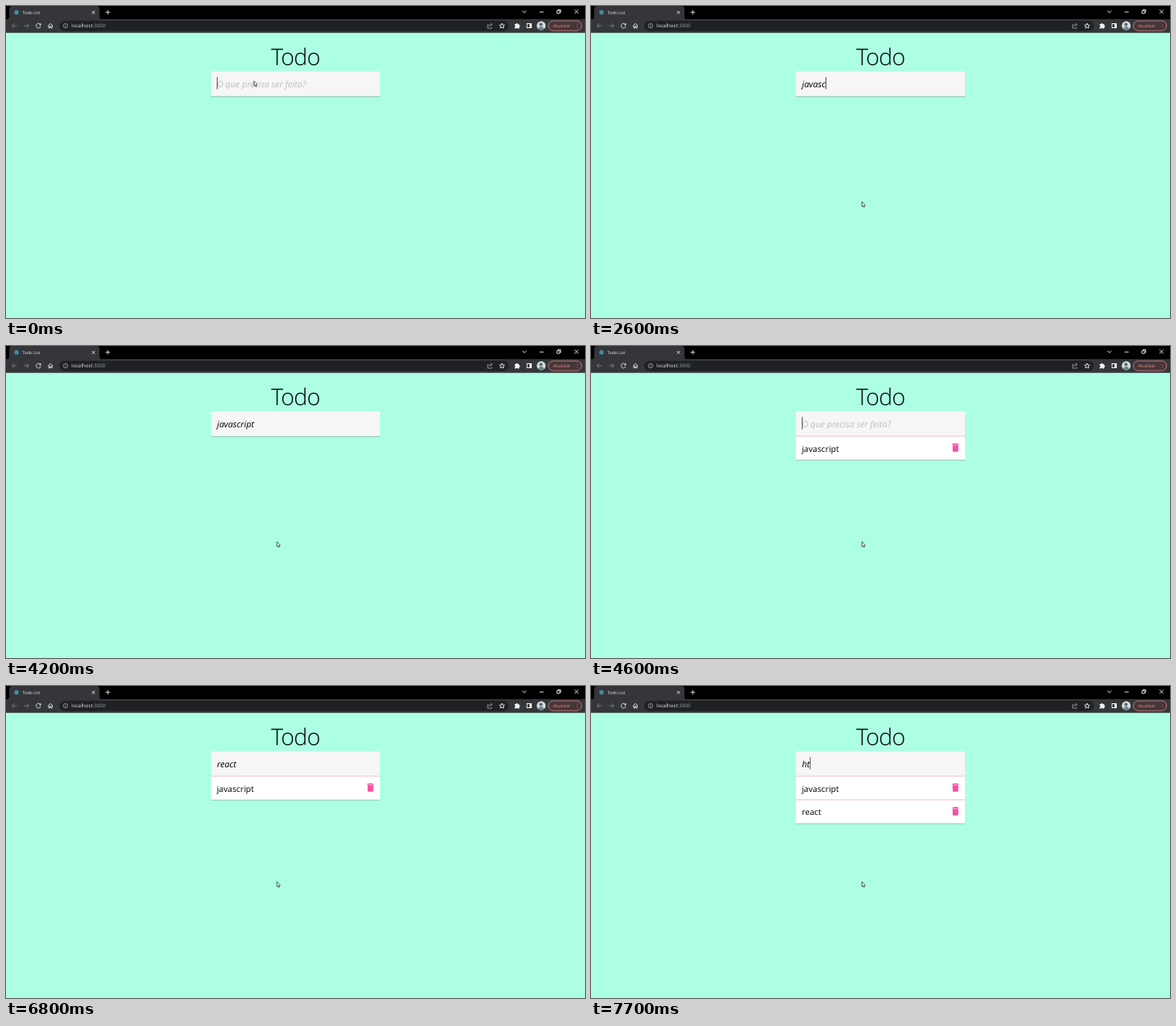
These frames come from a looping animation (706 px wide and 380 px high, 8 s). An HTML page:

```html
<!DOCTYPE html>
<html lang="pt">
<head>
<meta charset="utf-8">
<title>Todo List</title>
<style>
  html, body { margin: 0; width: 100%; height: 100%; overflow: hidden; background: #adffe4; }
  svg { display: block; width: 706px; height: 380px; }
  text { font-family: "Open Sans", "Noto Sans", sans-serif; text-rendering: geometricPrecision; white-space: pre; }
  .line { fill: none; stroke: #e8eaed; stroke-width: .9; }
  .dim { stroke: #7c7d80; }
  .soft { stroke: #b4b6b9; stroke-width: .7; }
  .entry { font-size: 10.6px; font-style: italic; }
  .item { font-size: 10.2px; }
</style>
</head>
<body>
<svg viewBox="0 0 706 380">
  <defs>
    <path id="bin" fill="#f153a6" transform="scale(.575)" d="M1 16c0 1.1.9 2 2 2h8c1.1 0 2-.9 2-2V4H1zM14 1h-3.5l-1-1h-5l-1 1H0v2h14z"/>
    <clipPath id="face"><circle cx="652.6" cy="24" r="5.4"/></clipPath>
  </defs>
  <rect width="706" height="380" fill="#adffe4"/>

  <!-- tab strip -->
  <rect width="706" height="17" fill="#000"/>
  <path fill="#35363a" d="M0 16.5Q4 16.5 4 12.500V4Q4 0 8 0H110Q114 0 114 4V12.500Q114 16.500 118 16.500Z"/>
  <circle cx="12.800" cy="7.700" r="2.700" fill="#3f8fa0"/>
  <text x="20" y="9.800" font-size="5.2" fill="#e8eaed">Todo List</text>
  <path class="line" d="M104.800 6l3.600 3.600m0-3.600l-3.600 3.600M121.400 7.700h5.400m-2.700-2.700v5.400"/>
  <path class="line" stroke-width=".7" d="M629.800 5.900l2.400 2.300 2.400-2.300M650.600 7.300h5M671.800 5.800h3.300v3.300h-3.300zM673 5.800v-1.200h3.300v3.300h-1.200M693.200 4.500l4.800 4.800m0-4.800l-4.800 4.800"/>

  <!-- toolbar -->
  <rect y="16" width="706" height="16.700" fill="#35363a"/>
  <path class="line dim" d="M13.200 24H7.400m2.800-2.900L7.300 24l2.900 2.900M22 24h5.800m-2.800-2.900l2.900 2.900-2.900 2.900"/>
  <path class="line" d="M41.800 22.300A2.800 2.800 0 1 0 42.300 24.800"/>
  <path fill="#e8eaed" d="M42.700 20.800v2.700H40z"/>
  <path class="line" d="M51.200 24.200l3-2.800 3 2.800M52.200 23.700v3.100h1.300v-1.900h1.400v1.900h1.300v-3.100"/>
  <rect x="65" y="18" width="548" height="12.400" rx="6.200" fill="#202124"/>
  <circle class="line soft" cx="72.600" cy="24.100" r="2.700"/>
  <path class="line soft" d="M72.600 23.700v1.900m0-3.300v.7"/>
  <text x="80" y="26.400" font-size="6.1" fill="#e8eaed">localhost<tspan fill="#9aa0a6">:3000</tspan></text>
  <path class="line soft" d="M588.600 22.500h-1.300v4.600h5v-1.300M588.900 25.300q.3-2.700 3.400-2.800m-1.300-1.600l1.800 1.600-1.800 1.600"/>
  <path class="line" stroke-width=".7" d="M604.900 21l.9 2.100 2.300.2-1.700 1.500.5 2.200-2-1.200-2 1.200.5-2.200-1.700-1.500 2.300-.2z"/>
  <path fill="#f1f3f4" d="M620.300 22h1.600a1.100 1.100 0 0 1 2.200 0h1.600v1.700a1.100 1.100 0 0 1 0 2.200v1.600h-1.700a1.100 1.100 0 0 0-2.100 0h-1.600v-1.700a1.100 1.100 0 0 0 0-2.100z"/>
  <path fill="#f1f3f4" fill-rule="evenodd" d="M634.800 21h6.300v6h-6.300zM635.700 21.900v4.200h2.700v-4.200z"/>
  <g clip-path="url(#face)">
    <rect x="647" y="18" width="12" height="12" fill="#d3dde0"/>
    <circle cx="652.300" cy="22.500" r="2" fill="#59676d"/>
    <path fill="#67868f" d="M649 30q0-5 3.500-5t4 5z"/>
  </g>
  <rect x="661.400" y="18.200" width="40.500" height="11.900" rx="5.950" fill="#453639" stroke="#e0857e" stroke-width=".8"/>
  <text x="667" y="25.900" font-size="5.2" fill="#f28b82">Atualizar</text>
  <g fill="#b06a66"><circle cx="696.500" cy="22" r=".5"/><circle cx="696.500" cy="24" r=".5"/><circle cx="696.500" cy="26" r=".5"/></g>

  <!-- page -->
  <text x="353" y="72" font-size="28" font-weight="300" letter-spacing="-.7" text-anchor="middle">Todo</text>
  <rect id="shade" x="250" y="80" width="206" height="31" fill="#8bbcab"/>
  <rect x="250" y="79.500" width="206" height="30.300" fill="#f6f6f6"/>
  <g id="list"></g>
  <text id="hint" class="entry" x="257.200" y="98.500" fill="#bdbdbd">O que precisa ser feito?</text>
  <text id="entry" class="entry" x="257.200" y="98.500"></text>
  <rect id="caret" y="86.500" width=".8" height="15" fill="#333"/>
  <path id="mouse" fill="#fff" stroke="#222" stroke-width=".7" stroke-linejoin="round" d="M.3.300V6.400L1.700 5.200 2.600 7.200 3.500 6.800 2.700 4.900H4.400Z"/>
</svg>
<script>
const LOOP = 8000, BLINK = 550, ROW = 28.8;
const $ = id => document.getElementById(id);

// [time, typed text, finished items]
const typing = [
  [-300, "", 0],
  [1600, "j", 0], [1700, "ja", 0], [1800, "jav", 0], [1900, "java", 0],
  [2100, "javas", 0], [2600, "javasc", 0], [2900, "javascr", 0],
  [3100, "javascri", 0], [3300, "javascrip", 0], [3600, "javascript", 0],
  [4600, "", 1],
  [5200, "r", 1], [5500, "re", 1], [5700, "rea", 1], [5900, "reac", 1], [6200, "react", 1],
  [7100, "", 2],
  [7300, "h", 2], [7700, "ht", 2]
];
// [time, x, y]
const moves = [[0, 302, 91], [100, 316, 50], [200, 326, 150], [300, 330, 238]];
const names = ["javascript", "react"];

$("list").innerHTML = names.map((name, i) => `
  <g transform="translate(0 ${i * ROW})">
    <rect x="250" y="109.800" width="206" height="${ROW}" fill="#fff"/>
    <rect x="250" y="109.600" width="206" height=".8" fill="#f8b9d8"/>
    <text class="item" x="257" y="128.600">${name}</text>
    <use href="#bin" x="440.400" y="118.500"/>
  </g>`).join("");
const rows = [...$("list").children];

const at = (steps, t) => steps.filter(s => s[0] <= t).pop();

function draw(t) {
  const [since, text, count] = at(typing, t);
  const [, x, y] = at(moves, t);
  $("entry").textContent = text;
  $("hint").style.display = text ? "none" : "";
  const width = text ? $("entry").getComputedTextLength() : 0;
  $("caret").setAttribute("x", 257.2 + width);
  $("caret").style.display = Math.floor((t - since) / BLINK) % 2 ? "none" : "";
  rows.forEach((row, i) => row.style.display = i < count ? "" : "none");
  $("shade").setAttribute("height", 30.7 + count * ROW);
  $("mouse").setAttribute("transform", `translate(${x} ${y})`);
}

const start = performance.now();
function tick() {
  draw((performance.now() - start) % LOOP);
  requestAnimationFrame(tick);
}
tick();
</script>
</body>
</html>
```
